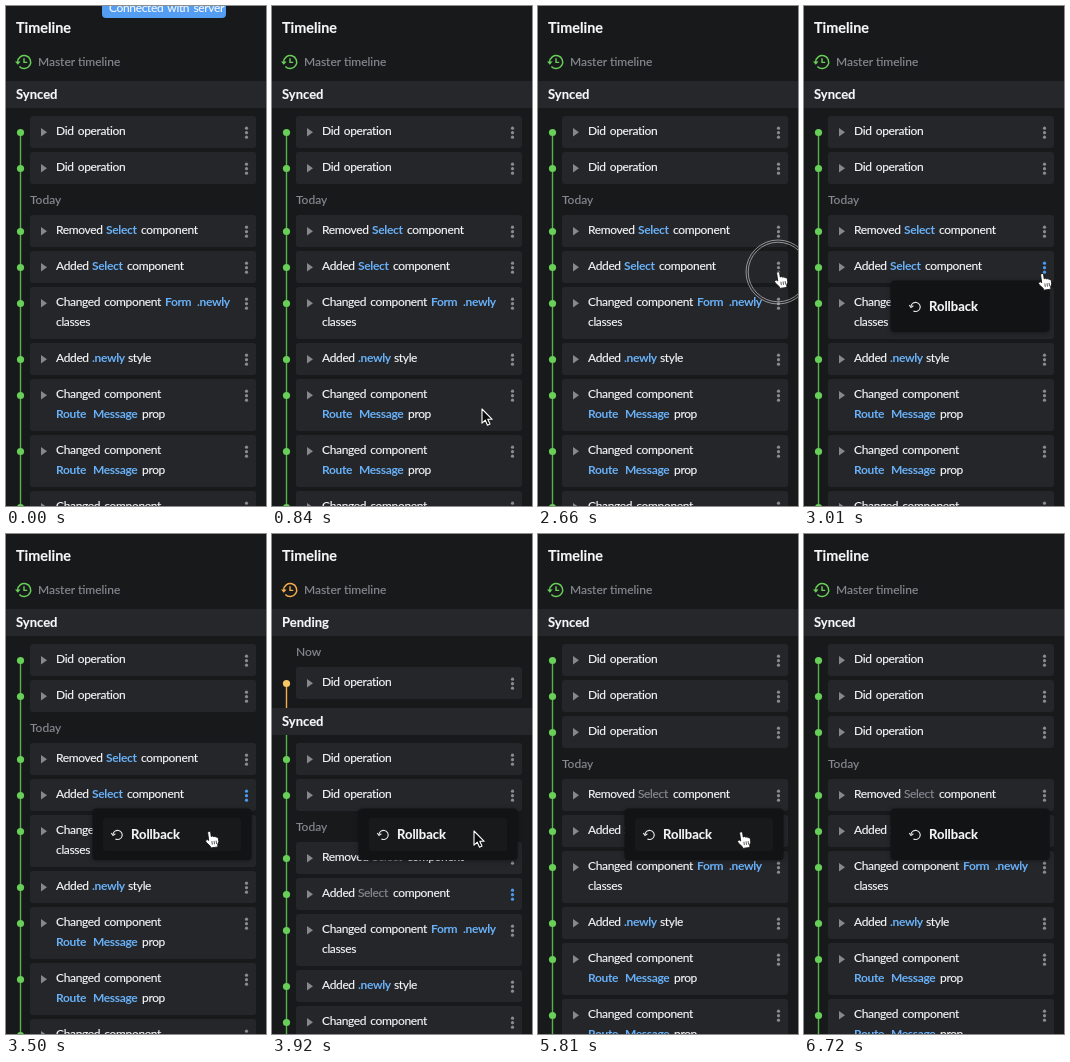
These frames come from a looping animation (260x500 px, 6.79 s). An HTML page:

```html
<!DOCTYPE html>
<html lang="en">
<head>
<meta charset="utf-8">
<title>Timeline</title>
<style>
  html, body { margin: 0; width: 100%; height: 100%; overflow: hidden; background: #18191b; }
  svg { display: block; width: 260px; height: 500px; }
  text { font: 12px Lato, sans-serif; fill: #f6f7f8; stroke: #f6f7f8; stroke-width: 0.15px; white-space: pre; }
  .row { letter-spacing: -0.35px; word-spacing: 1.5px; }
  .bold { font-size: 13px; font-weight: 700; }
  .title { font-size: 14.4px; font-weight: 700; }
  .muted { fill: #878b92; stroke: #878b92; }
  .link { fill: #68b1f8; stroke: none; font-weight: 700; }
</style>
</head>
<body>
<svg id="stage" viewBox="0 0 260 500"></svg>
<script>
const LOOP = 6790, STEP = 70;
const GREEN = '#68cf58', ORANGE = '#f5ad4b', YELLOW = '#f8c765', BLUE = '#4a9cf0', GREY = '#898c90';
const stage = document.getElementById('stage');

function add(parent, tag, attrs = {}, content = '') {
  const el = document.createElementNS('http://www.w3.org/2000/svg', tag);
  for (const [key, value] of Object.entries(attrs)) el.setAttribute(key, value);
  el.textContent = content;
  parent.appendChild(el);
  return el;
}
const group = (parent = stage) => add(parent, 'g');
const text = (g, x, y, content, cls = '') => add(g, 'text', { x, y, class: cls }, content);
const box = (g, x, y, width, height, fill, rx = 0) => add(g, 'rect', { x, y, width, height, fill, rx });
const path = (g, d, attrs) => add(g, 'path', { d, fill: 'none', ...attrs });

// Each row is a list of lines, each line a list of [x, text, class].
const did = () => [[[50, 'Did operation']]];
const selectRow = (verb, x, cls) => [[[50, verb], [x, 'Select', cls], [x + 35, 'component']]];
const routeRow = () => [
  [[50, 'Changed component']],
  [[50, 'Route', 'link'], [87, 'Message', 'link'], [136, 'prop']]
];

function drawRow(g, y, lines, color, dotsColor = GREY) {
  const height = 12 + lines.length * 20;
  box(g, 24, y, 226, height, '#25262a', 3);
  add(g, 'path', { d: `M35 ${y + 12}l6 4.2l-6 4.2z`, fill: '#85888c' });
  for (const dy of [12.2, 16.7, 21.2])
    add(g, 'circle', { cx: 240.5, cy: y + dy, r: 1.6, fill: dotsColor });
  lines.forEach((line, i) => line.forEach(([x, content, cls = '']) =>
    text(g, x, y + 19.3 + i * 20, content, 'row ' + cls)));
  add(g, 'circle', { cx: 14.5, cy: y + 16.5, r: 3.6, fill: color });
  return y + height + 4;
}

function drawHeader(g, y, label) {
  box(g, 0, y, 260, 27, '#26272b');
  text(g, 10, y + 18, label, 'bold');
}

function drawClock(g, color) {
  path(g, 'M11.7 56A6.5 6.5 0 1 1 13.4 60.4', { stroke: color, 'stroke-width': 1.5 });
  add(g, 'path', { d: 'M9 55.4H14.6L11.8 58.8z', fill: color });
  path(g, 'M18 52.3V56.4H21.2', { stroke: color, 'stroke-width': 1.4 });
}

function drawScene({ pending = false, count = 2, cls = 'link', active = false }) {
  const g = group();
  const top = pending ? 174 : 75;
  const line = (y1, y2, color) => box(g, 13.8, y1, 1.4, y2 - y1, color);
  drawClock(g, pending ? ORANGE : GREEN);
  if (pending) {
    line(149, 174, ORANGE);
    drawHeader(g, 75, 'Pending');
    text(g, 24, 122, 'Now', 'muted');
    drawRow(g, 133, did(), YELLOW);
  }
  drawHeader(g, top, 'Synced');
  line(pending ? 201 : 126, 500, '#56b24b');
  let y = top + 35;
  const row = (lines, dots) => { y = drawRow(g, y, lines, GREEN, dots); };
  for (let i = 0; i < count; i++) row(did());
  text(g, 24, y + 16, 'Today', 'muted');
  y += 27;
  row(selectRow('Removed', 100, cls));
  row(selectRow('Added', 86, cls), active ? BLUE : GREY);
  row([
    [[50, 'Changed component'], [159, 'Form', 'link'], [191, '.newly', 'link']],
    [[50, 'classes']]
  ]);
  row([[[50, 'Added'], [86, '.newly', 'link'], [122, 'style']]]);
  while (y < 500) row(routeRow());
  return g;
}

text(stage, 10, 27, 'Timeline', 'title');
text(stage, 32, 60, 'Master timeline', 'muted');

const scenes = [
  [0, drawScene({})],
  [2800, drawScene({ active: true })],
  [3850, drawScene({ pending: true, cls: 'muted', active: true })],
  [4410, drawScene({ count: 3, cls: 'muted' })]
];

const menu = group();
menu.style.filter = 'drop-shadow(0 1px 2px rgba(0,0,0,.35))';
box(menu, 86.5, 274.5, 159, 51.5, '#121315', 4);
const hover = box(menu, 97, 284, 138, 33, '#18191b', 3);
path(menu, 'M107 300.4A4.6 4.6 0 1 1 109.4 305', { stroke: '#e4e5e6', 'stroke-width': 1.1 });
path(menu, 'M105.2 299L107 301.4L109.4 299.8', { stroke: '#e4e5e6', 'stroke-width': 1.1 });
text(menu, 125, 305, 'Rollback', 'bold');

const toast = group();
box(toast, 96, -20, 124, 32, '#539df2', 4);
text(toast, 103, 5.8, 'Connected with server', 'row');

const ring = group();
for (const r of [29.8, 32])
  add(ring, 'circle', { r, fill: 'none', stroke: '#c4c4c4', 'stroke-width': 0.7 });

const cursor = group();
const arrow = path(cursor, 'M0 0V14.2L3.3 11.2L5.5 16.2L8 15.1L5.8 10.3H10.2Z',
  { fill: '#0b0b0c', stroke: '#fff', 'stroke-width': 1.1, 'stroke-linejoin': 'round' });
const hand = group(cursor);
hand.setAttribute('transform', 'rotate(-8)');
path(hand, 'M-1.5 8.8V1.2Q-1.5 -.3 0 -.3T1.5 1.2V5.3Q3 4.5 4 5.8Q5.4 5.1 6.2 6.5Q8.3 6.2 8.3 8.4V11.5L6.8 14V16.5H-.7V14.8L-4.2 10.5Q-5.3 8.8 -4 8T-1.5 8.8Z',
  { fill: '#fff', stroke: '#111', 'stroke-width': 0.8, 'stroke-linejoin': 'round' });
path(hand, 'M1.5 10V13.5M3.7 10V13.5M5.8 10V13.5', { stroke: '#222', 'stroke-width': 0.7 });

// [time, x, y]: the pointer eases between these stops.
const stops = [
  [560, 196, 506], [1120, 224, 300], [1470, 234, 259], [1680, 240, 266],
  [2940, 240, 266], [3430, 203, 297.5], [3780, 203, 297.5], [3850, 202, 297],
  [4410, 202, 297], [4480, 203, 298], [6090, 203, 298], [6510, 186, 506]
];
const handTimes = [[1610, 3850], [4480, 6160]];
const pressTimes = [[1750, 2800], [3640, 3850]];

const within = (t, spans) => spans.some(([from, to]) => t >= from && t < to);
const show = (el, on) => { el.style.display = on ? '' : 'none'; };

function pointerAt(t) {
  const i = stops.findIndex(stop => stop[0] > t);
  if (i < 1) return stops[i < 0 ? stops.length - 1 : 0].slice(1);
  const [t0, x0, y0] = stops[i - 1], [t1, x1, y1] = stops[i];
  const p = (t - t0) / (t1 - t0), e = p * p * (3 - 2 * p);
  return [x0 + (x1 - x0) * e, y0 + (y1 - y0) * e];
}

function render(now) {
  const t = Math.floor((now % LOOP) / STEP) * STEP;
  scenes.forEach(([from, g], i) => {
    const to = i + 1 < scenes.length ? scenes[i + 1][0] : LOOP;
    show(g, t >= from && t < to);
  });
  show(toast, t < 210);
  toast.setAttribute('transform', `translate(0 ${-t / 210 * 13})`);
  show(menu, t >= 2800);
  show(hover, t >= 3290 && t < 6300);

  const [x, y] = pointerAt(t);
  show(cursor, t >= 560 && t < 6510);
  cursor.setAttribute('transform', `translate(${x} ${y})`);
  const pointing = within(t, handTimes);
  show(hand, pointing);
  show(arrow, !pointing);
  show(ring, within(t, pressTimes));
  ring.setAttribute('transform', `translate(${x} ${y})`);
}

const start = performance.now();
function tick() {
  render(performance.now() - start);
  requestAnimationFrame(tick);
}
tick();
</script>
</body>
</html>
```
